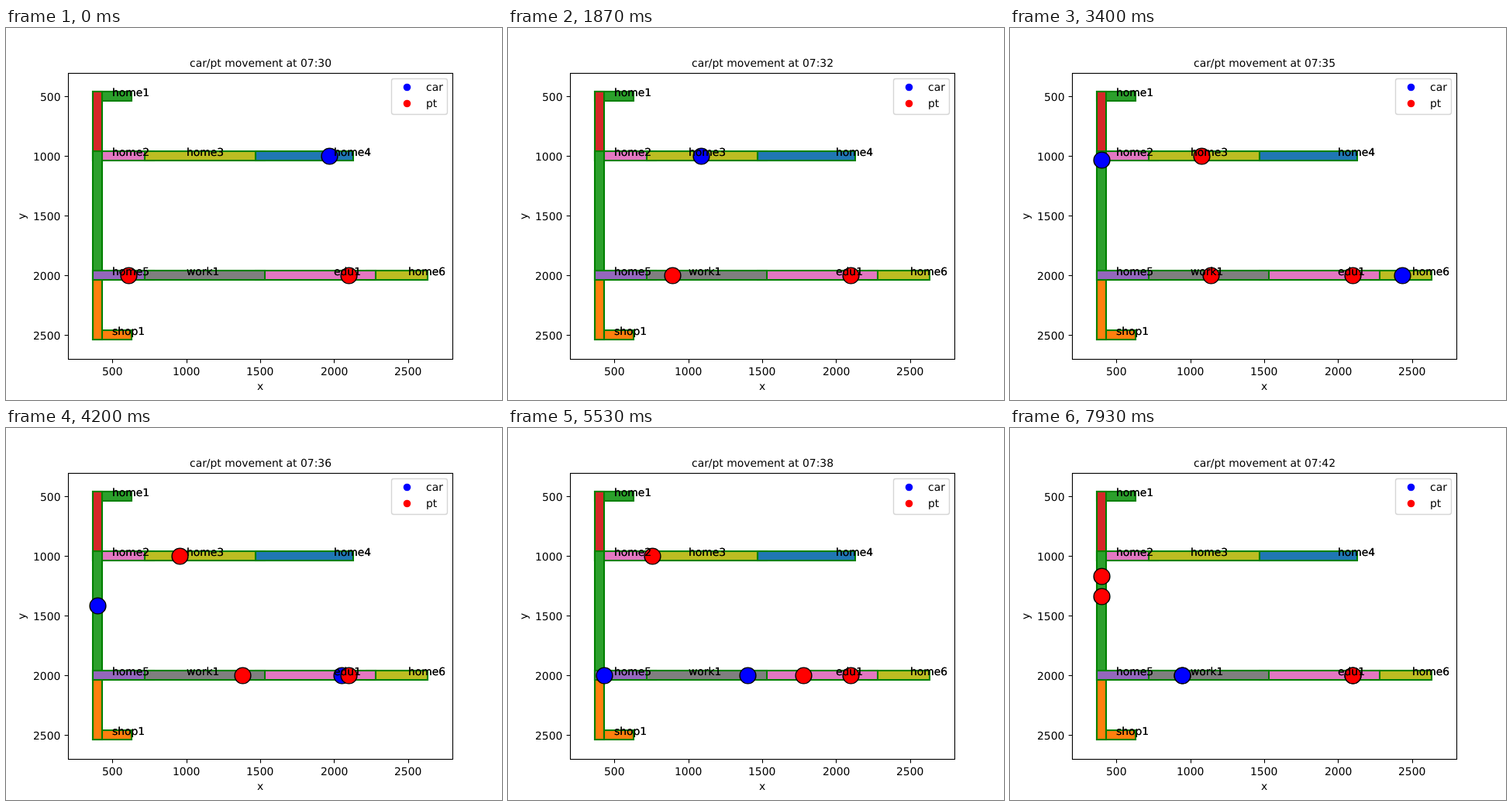
Write an HTML page with a canvas that moves like this. It is 640 by 480 pixels and loops after 8 s.

```html
<!DOCTYPE html>
<html lang="en">
<head>
<meta charset="utf-8">
<title>car/pt movement</title>
<style>
  html, body { margin: 0; width: 100%; height: 100%; overflow: hidden; background: #fff; }
  canvas { display: block; }
</style>
</head>
<body>
<canvas id="stage" width="640" height="480"></canvas>
<script>
const ctx = document.getElementById('stage').getContext('2d');
const LOOP = 8000, STEPS = 120;
const START_MINUTE = 30, STEPS_PER_MINUTE = 10;
const CAR = '#00f', PT = '#f00';
const GREEN = '#2ca02c', RED = '#d62728', PINK = '#e377c2', OLIVE = '#bcbd22',
      BLUE = '#1f77b4', ORANGE = '#ff7f0e', PURPLE = '#9467bd', GRAY = '#7f7f7f';

// Data to pixel coordinates
const px = x => 80 + (x - 200) * 496 / 2600;
const py = y => 57.6 + (y - 300) * 369.6 / 2400;

// Legs of a journey: speed in units per step, wait in steps after arriving
const drive = (x, y, wait = 0.5) => ({ x, y, wait, speed: 100 / 3 });
const walk = (x, y, wait = 0) => ({ x, y, wait, speed: 10 });
const ride = (x, y, speed = 20, wait = 0.5) => ({ x, y, wait, speed });

// A traveller appears at the start step and stays at the end of the last leg
const travellers = [
  { color: CAR, start: -1, x: 2000, y: 1000, legs: [
    drive(1500, 1000, 1.5), drive(750, 1000, 1.1), drive(400, 1000),
    drive(400, 1250), drive(400, 2000, 1.5), drive(750, 2000), drive(945, 2000)] },
  { color: CAR, start: 49, x: 2500, y: 2000, legs: [
    drive(2250, 2000), drive(1500, 2000), drive(750, 2000), drive(945, 2000)] },
  { color: PT, start: -1, x: 2100, y: 2000, legs: [] },
  { color: PT, start: -1, x: 600, y: 2000, legs: [walk(1100, 2000), ride(2100, 2000)] },
  { color: PT, start: 48.7, x: 1100, y: 1000, legs: [
    walk(600, 1000, 0.3), ride(400, 1000, 27.4), ride(400, 2000, 27.4)] },
  { color: PT, start: 99, x: 600, y: 1000, legs: [
    ride(400, 1000, 18.8), ride(400, 2000, 18.8)] }
];

const labels = {
  500: { home1: 500 },
  1000: { home2: 500, home3: 1000, home4: 2000 },
  2000: { home5: 500, work1: 1000, edu1: 2000, home6: 2500 },
  2500: { shop1: 500 }
};

function positionAt({ start, x, y, legs }, step) {
  let time = start;
  for (const leg of legs) {
    const duration = Math.hypot(leg.x - x, leg.y - y) / leg.speed;
    const k = Math.min(1, (step - time) / duration);
    if (k < 1) return [x + (leg.x - x) * k, y + (leg.y - y) * k];
    time += duration + leg.wait;
    ({ x, y } = leg);
    if (step < time) break;
  }
  return [x, y];
}

// Text starts on a whole pixel; align is 0 for left, 0.5 for centre, 1 for right
function text(string, x, y, align = 0) {
  ctx.fillStyle = '#000';
  const left = x - ctx.measureText(string).width * align;
  ctx.fillText(string, Math.round(left), Math.round(y));
}

function line(x0, y0, x1, y1) {
  ctx.beginPath();
  ctx.moveTo(x0, y0);
  ctx.lineTo(x1, y1);
  ctx.stroke();
}

function dot(x, y, radius, color) {
  ctx.beginPath();
  ctx.arc(x, y, radius, 0, 2 * Math.PI);
  ctx.fillStyle = color;
  ctx.fill();
}

// A street is its centre line widened by 30 across and 40 down
function street(color, x0, y0, x1, y1) {
  const left = Math.round(px(Math.min(x0, x1) - 30)), right = Math.round(px(Math.max(x0, x1) + 30));
  const top = Math.floor(py(y0 - 40)), bottom = Math.floor(py(y1 + 40));
  const box = [left, top, right - left, bottom - top];
  ctx.fillStyle = color;
  ctx.fillRect(...box);
  ctx.strokeRect(...box);
}

const row = (y, nodes, colors) =>
  colors.forEach((color, i) => street(color, nodes[i], y, nodes[i + 1], y));
const column = (y0, y1, color) => street(color, 400, y0, 400, y1);

// Later streets cover the ends of earlier ones
function drawStreets() {
  ctx.strokeStyle = '#008000';
  ctx.lineWidth = 2.08;
  row(500, [400, 600], [GREEN]);
  column(500, 1000, RED);
  row(1000, [400, 750, 1500, 2100], [PINK, OLIVE, BLUE]);
  column(1000, 2000, GREEN);
  row(2500, [400, 600], [ORANGE]);
  column(2000, 2500, ORANGE);
  row(2000, [2600, 2250, 1500], [OLIVE, PINK]);
  row(2000, [400, 750, 1500], [PURPLE, GRAY]);
}

function drawTravellers(step) {
  ctx.strokeStyle = '#000';
  ctx.lineWidth = 1.39;
  for (const traveller of travellers) {
    if (step < traveller.start) continue;
    const [x, y] = positionAt(traveller, step);
    dot(Math.round(px(x)) + 0.5, Math.round(py(y)) + 0.5, 10.42, traveller.color);
    ctx.stroke();
  }
}

function drawAxes() {
  ctx.strokeStyle = '#000';
  ctx.lineWidth = 1.11;
  ctx.strokeRect(80.5, 58.5, 496, 369);
  for (let value = 500; value <= 2500; value += 500) {
    const x = Math.round(px(value)) + 0.5, y = Math.round(py(value)) + 0.5;
    line(x, 427.5, x, 432.4);
    line(80.5, y, 75.6, y);
    text(value, px(value), 448, 0.5);
    text(value, 70.3, py(value) + 5.5, 1);
  }
  text('x', 328, 467, 0.5);
  ctx.save();
  ctx.translate(25, 243);
  ctx.rotate(-Math.PI / 2);
  text('y', 0, 0, 0.5);
  ctx.restore();
}

function drawLabels() {
  for (const [y, names] of Object.entries(labels)) {
    for (const [name, x] of Object.entries(names)) {
      // Printed twice, which makes the edges heavier
      text(name, px(x), py(y));
      text(name, px(x), py(y));
    }
  }
}

function drawLegend() {
  ctx.beginPath();
  ctx.roundRect(497.5, 65.5, 72, 46, 2.8);
  ctx.fillStyle = 'rgba(255, 255, 255, 0.8)';
  ctx.fill();
  ctx.strokeStyle = '#d6d6d6';
  ctx.lineWidth = 1.39;
  ctx.stroke();
  [['car', CAR], ['pt', PT]].forEach(([name, color], i) => {
    const y = 76.5 + 21 * i;
    dot(517.5, y, 4.8, color);
    text(name, 542, y + 4.5);
  });
}

function draw(step) {
  ctx.fillStyle = '#fff';
  ctx.fillRect(0, 0, 640, 480);
  ctx.font = '13.889px "DejaVu Sans", sans-serif';
  ctx.textRendering = 'geometricPrecision';
  drawStreets();
  drawTravellers(step);
  drawAxes();
  drawLabels();
  const minute = START_MINUTE + Math.floor((step + 1) / STEPS_PER_MINUTE);
  text(`car/pt movement at 07:${minute}`, 328, 50, 0.5);
  drawLegend();
}

// Steps start on times rounded to 10 ms, up to 4 ms early
function tick() {
  const time = performance.now() % LOOP;
  draw(Math.floor((time + 4) * STEPS / LOOP) % STEPS);
  requestAnimationFrame(tick);
}
tick();
</script>
</body>
</html>
```
